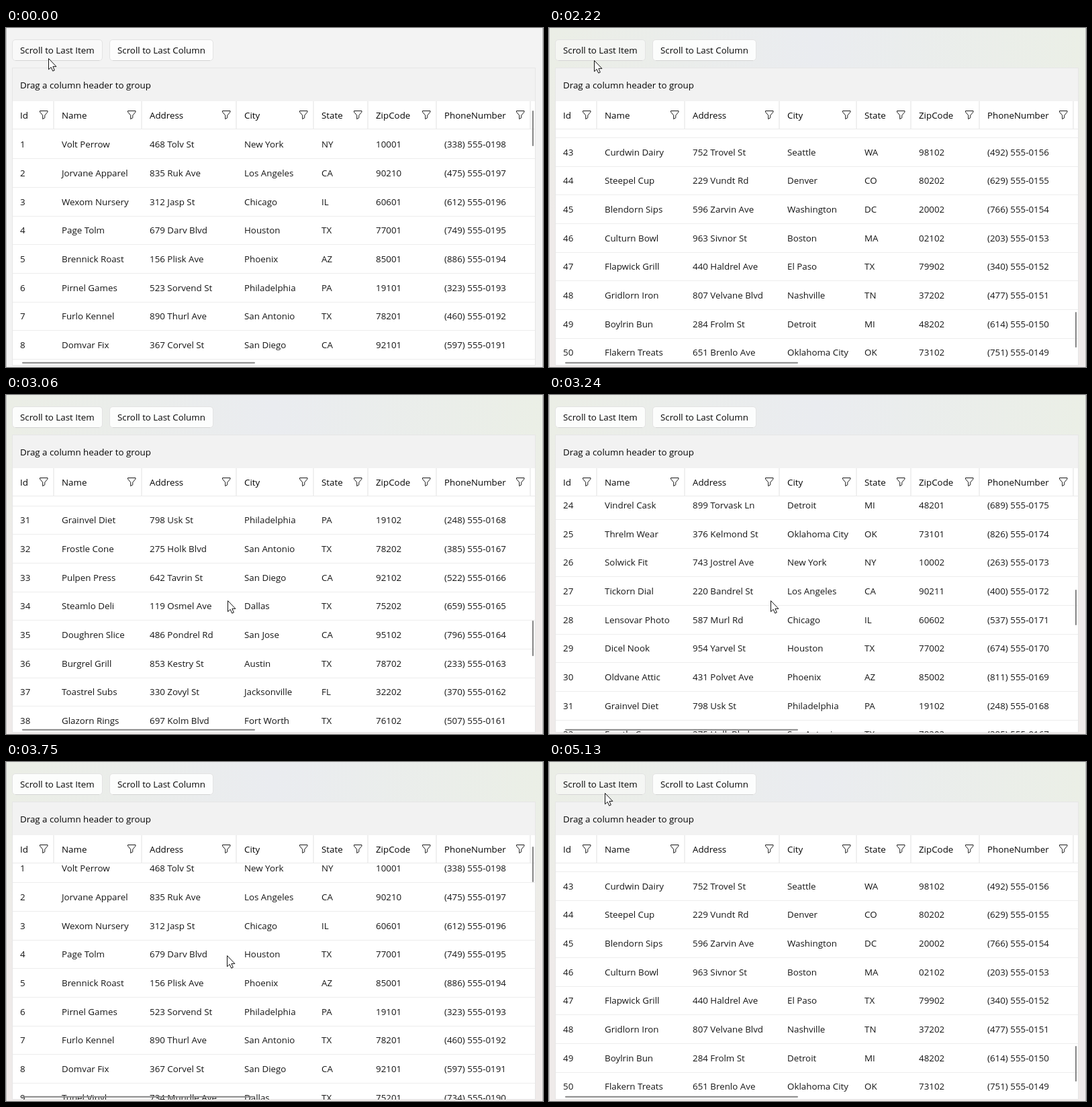
These frames come from a looping animation (800 by 505 pixels, 6.24 s). An HTML page:

```html
<!DOCTYPE html>
<html lang="en">
<head>
<meta charset="utf-8">
<title>Data grid scrolling</title>
<style>
html, body { margin: 0; width: 100%; height: 100%; overflow: hidden; background: #f3f3f3; }
svg { display: block; width: 100vw; height: 100vh; }
text { font: 13.35px "Open Sans", "Noto Sans", sans-serif; fill: #050505; white-space: pre; }
#rows text { fill: #161616; }
</style>
</head>
<body>
<svg id="stage" viewBox="0 0 800 505">
  <defs>
    <linearGradient id="tint">
      <stop offset="0" stop-color="#ebeee6"/>
      <stop offset=".5" stop-color="#eaecf0"/>
      <stop offset="1" stop-color="#ebefe6"/>
    </linearGradient>
    <linearGradient id="warm" x2="0" y2="1">
      <stop offset=".1" stop-color="#efebea" stop-opacity="0"/>
      <stop offset=".6" stop-color="#efebea"/>
    </linearGradient>
    <clipPath id="view"><rect x="10" y="151" width="779" height="352"/></clipPath>
  </defs>
  <rect width="800" height="505" fill="#f3f3f3"/>
  <g id="mica">
    <rect width="800" height="505" fill="url(#tint)"/>
    <rect width="800" height="505" fill="url(#warm)"/>
  </g>
  <path d="M.5 0V505M799.5 0V505" stroke="#bcbcbc"/>
  <g id="buttons"></g>
  <rect x="9.5" y="59.5" width="779" height="443" fill="#fff" stroke="#e6e6e6"/>
  <rect x="10" y="60" width="778" height="49" fill="#f2f2f2"/>
  <text x="21" y="90">Drag a column header to group</text>
  <g id="rows" clip-path="url(#view)"></g>
  <g id="head"><path d="M10 150.5H788" stroke="#ebebeb"/></g>
  <path d="M25 498.8H370" stroke="#858585" stroke-width="2" stroke-linecap="round"/>
  <path id="thumb" d="M785 124V175" stroke="#858585" stroke-width="2" stroke-linecap="round"/>
  <path id="cursor" d="M0 0V16.3L3.7 12.9L6.2 18.6L8.8 17.5L6.4 11.9H11.4Z" fill="#fff" stroke="#111" stroke-linejoin="round"/>
</svg>
<script>
const LOOP = 6240, STEP = 30, ROW = 42.667, END = 1780.7;
const $ = id => document.getElementById(id);

// Title, text position, right edge.
const columns = [['Id', 21, 71], ['Name', 83, 202], ['Address', 214, 343], ['City', 355, 458],
  ['State', 470, 539], ['ZipCode', 551, 641], ['PhoneNumber', 653, 781]];

const shops = `Volt Perrow|Jorvane Apparel|Wexom Nursery|Page Tolm|Brennick Roast|Pirnel Games|Furlo Kennel|Domvar Fix|Tunel Vinyl|Osk Canvases
Lumvay Lamps|Quarn Jewels|Pelgro Pantry|Crustel Oven|Petalorn Co|Circuivane Supply|Plushorn Den|Musclorn Gym|Glamvey Spa|Boltrick Tools
Spokle Hut|Nibworth Pens|Tilmar Frames|Vindrel Cask|Threlm Wear|Solwick Fit|Tickorn Dial|Lensovar Photo|Dicel Nook|Oldvane Attic
Grainvel Diet|Frostle Cone|Pulpen Press|Steamlo Deli|Doughren Slice|Burgrel Grill|Toastrel Subs|Glazorn Rings|Sugarvel Jar|Plumvar Stand
Haddrin Dock|Choplen Cut|Curdwin Dairy|Steepel Cup|Blendorn Sips|Culturn Bowl|Flapwick Grill|Gridlorn Iron|Boylrin Bun|Flakern Treats`.split(/[|\n]/);

const streets = `Tolv St|Ruk Ave|Jasp St|Darv Blvd|Plisk Ave|Sorvend St|Thurl Ave|Corvel St|Mundle Ave|Pelk St
Wimrow Ave|Jandle Rd|Brovander|Morklet St|Chorvel St|Umbrin St|Stelv St|Candrel Ave|Hosk St|Vandry Rd
Rindle Dr|Lomvy St|Fendrow Ave|Torvask Ln|Kelmond St|Jostrel Ave|Bandrel St|Murl Rd|Yarvel St|Polvet Ave
Usk St|Holk Blvd|Tavrin St|Osmel Ave|Pondrel Rd|Kestry St|Zovyl St|Kolm Blvd|Marl St|Olimver Ave
Nolve St|Irlin Ave|Trovel St|Vundt Rd|Zarvin Ave|Sivnor St|Haldrel Ave|Velvane Blvd|Frolm St|Brenlo Ave`.split(/[|\n]/);

const cities = `New York,NY,10001|Los Angeles,CA,90210|Chicago,IL,60601|Houston,TX,77001|Phoenix,AZ,85001
Philadelphia,PA,19101|San Antonio,TX,78201|San Diego,CA,92101|Dallas,TX,75201|San Jose,CA,95101
Austin,TX,78701|Jacksonville,FL,32201|Fort Worth,TX,76101|Columbus,OH,43201|Charlotte,NC,28201
San Francisco,CA,94101|Indianapolis,IN,46201|Seattle,WA,98101|Denver,CO,80201|Washington,DC,20001
Boston,MA,02101|El Paso,TX,79901|Nashville,TN,37201|Detroit,MI,48201|Oklahoma City,OK,73101`
  .split(/[|\n]/).map(c => c.split(','));

const label = (x, y, s) => `<text x="${x}" y="${y}">${s}</text>`;

function record(i) {
  const [city, state, zip] = cities[i % 25], id = i + 1;
  const code = String(+zip + (i >= 25)).padStart(5, '0');
  const house = 101 + id * 367 % 890, area = 201 + id * 137 % 700;
  return [id, shops[i], `${house} ${streets[i]}`, city, state, code, `(${area}) 555-01${99 - id}`];
}

$('rows').innerHTML = shops.map((_, i) => '<g><path d="M10 194.5H788" stroke="#ededed"/>' +
  record(i).map((v, c) => label(columns[c][1], 178, v)).join('') + '</g>').join('');

$('head').innerHTML += columns.map(([name, x, edge]) => label(x, 135, name) +
  `<path d="M${edge} 109V150" stroke="#f0f0f0" stroke-width="2"/>
   <path d="M${edge - 20.5} 123.5h11.5v1.6l-4.2 5v3.6l-3.1 1.9v-5.5l-4.2-5z" fill="none" stroke="#1c1c1c" stroke-linejoin="round"/>`).join('');

const button = (x, w, s) => `<g><rect x="${x}.5" y="17.5" width="${w}" height="31" rx="4.5" fill="#fff" fill-opacity=".88" stroke="#e3e3e3"/>
  <path d="M${x + 5} 48.5h${w - 9}" stroke="#d4d4d4"/>${label(x + 12, 38, s)}</g>`;
$('buttons').innerHTML = button(9, 134, 'Scroll to Last Item') + button(154, 154, 'Scroll to Last Column');

const rows = [...$('rows').children];
const [face, rim, caption] = $('buttons').children[0].children;

const clamp = v => Math.max(0, Math.min(1, v));
const smooth = u => u * u * (3 - 2 * u);
const between = (t, a, b) => t >= a && t < b;
const move = (id, x, y) => $(id).setAttribute('transform', `translate(${x} ${y})`);

// Monotone cubic through [time, value] points.
function spline(points, t) {
  const n = points.length - 1;
  if (t <= points[0][0]) return points[0][1];
  if (t >= points[n][0]) return points[n][1];
  const rate = i => (points[i + 1][1] - points[i][1]) / (points[i + 1][0] - points[i][0]);
  const slope = i => {
    if (i === 0 || i === n) return 0;
    const a = rate(i - 1), b = rate(i);
    return a * b > 0 ? 2 * a * b / (a + b) : 0;
  };
  const i = points.findIndex(p => p[0] > t) - 1;
  const [t0, v0] = points[i], [t1, v1] = points[i + 1];
  const h = t1 - t0, u = (t - t0) / h;
  return v0 + (v1 - v0) * smooth(u) + h * u * (1 - u) * ((1 - u) * slope(i) - u * slope(i + 1));
}

const wheel = [[2760, END], [2880, 1538.5], [3240, 990.5], [3450, 537], [3750, 15], [3840, 0]];
const pathX = [[30, 63], [420, 61], [2190, 61], [2520, 330], [3690, 330], [3750, 329], [4020, 110], [4230, 90], [4650, 83]];
const pathY = [[30, 45], [420, 42], [2190, 42], [2520, 306], [3690, 306], [4020, 79], [4230, 52], [4650, 46]];

function scrollAt(t) {
  if (t < 960) return 0;
  return t >= 5130 ? END : spline(wheel, t);
}

function draw(t) {
  const top = scrollAt(t), x = Math.round(spline(pathX, t)), y = Math.round(spline(pathY, t));
  rows.forEach((row, i) => {
    const dy = Math.round(i * ROW + .2 - top);
    row.style.display = between(dy, -50, 345) ? '' : 'none';
    row.setAttribute('transform', `translate(0 ${dy})`);
  });
  move('thumb', 0, Math.round(top * 300 / END));
  move('cursor', x + .5, y + .5);
  $('mica').setAttribute('opacity', clamp((t - 660) / 240));

  const hover = between(x, 9, 144) && between(y, 17, 49);
  const pressed = between(t, 690, 810) || between(t, 4860, 4980);
  face.setAttribute('fill-opacity', pressed ? .3 : hover ? .5 : .88);
  rim.setAttribute('opacity', pressed ? 0 : 1);
  caption.style.fill = pressed ? '#5d5d5d' : '';
}

const start = performance.now();
function tick(now) {
  const t = Math.max(0, now - start) % LOOP;
  draw(t - t % STEP);
  requestAnimationFrame(tick);
}
draw(0);
requestAnimationFrame(tick);
</script>
</body>
</html>
```
